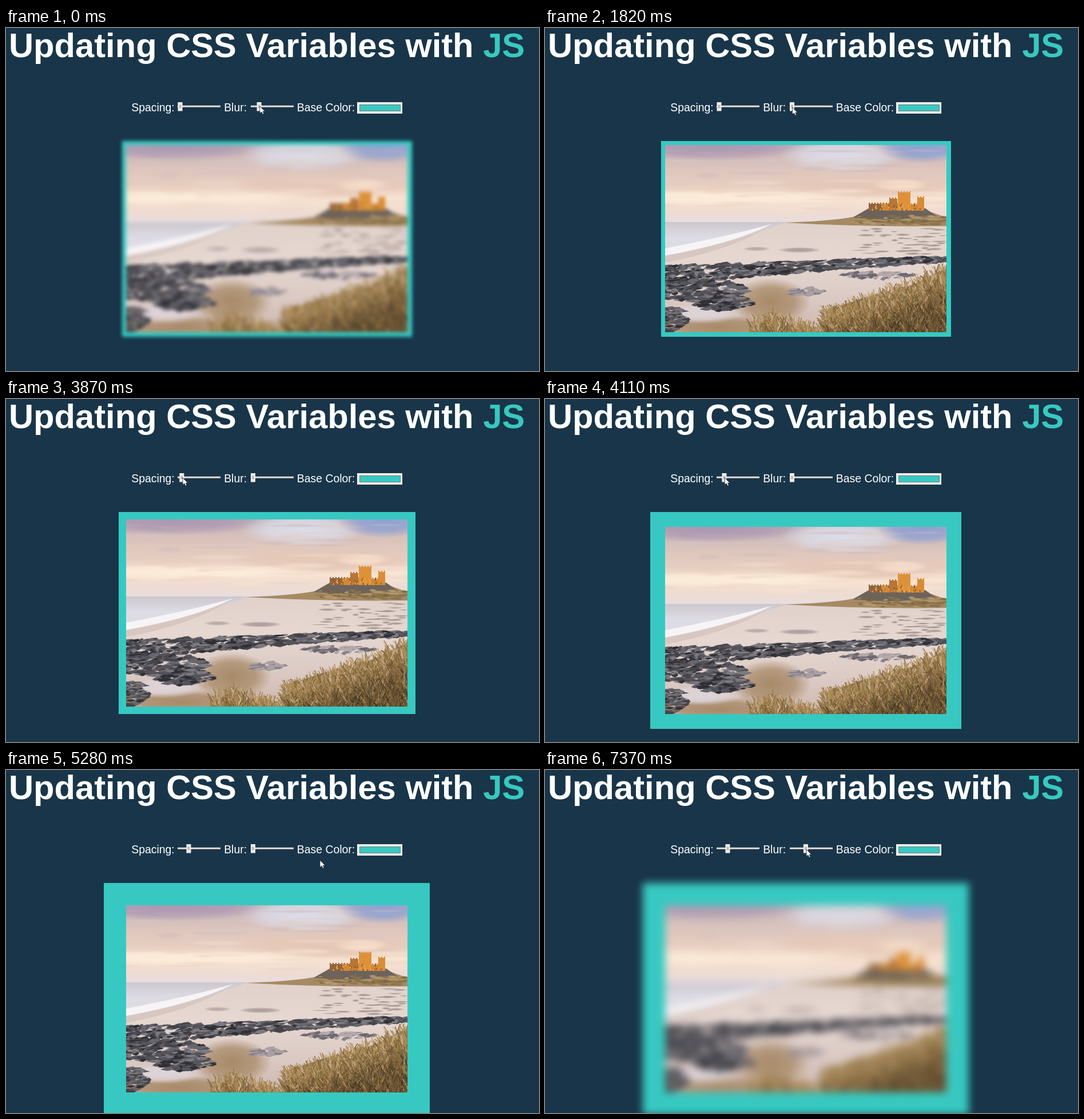
An HTML page with a canvas that plays this animation: 932x601 px, repeating every 8000 ms.

```html
<!DOCTYPE html>
<html lang="en">
<head>
<meta charset="utf-8">
<title>Updating CSS Variables with JS</title>
<style>
  :root { --base: #37c9c1; --spacing: 7.5px; --blur: 0px; }
  html, body { margin: 0; width: 100%; height: 100%; overflow: hidden; background: #193549; }
  canvas, svg { position: absolute; }
  canvas {
    left: calc(210.3px - var(--spacing)); top: 197.6px;
    padding: var(--spacing); background: var(--base); filter: blur(var(--blur));
  }
  svg { left: 0; top: 0; }
  text { font: 19.4px "Liberation Sans", Arial, sans-serif; fill: #fff; }
  .title { font-size: 59.7px; font-weight: bold; }
  .base { fill: var(--base); }
</style>
</head>
<body>
<canvas id="photo" width="492" height="328"></canvas>
<svg width="932" height="601" viewBox="0 0 932 601">
  <defs>
    <g id="thumb">
      <rect x="-4" y="130" width="8" height="15.5" fill="#f1efed"/>
      <path d="M-2 135.5h4M-2 137.5h4M-2 139.5h4" stroke="#8d8a88"/>
    </g>
  </defs>
  <text class="title" x="5" y="50.6">Updating CSS Variables with <tspan class="base">JS</tspan></text>
  <text x="219.3" y="145.5">Spacing:</text>
  <text x="381.2" y="145.5">Blur:</text>
  <text x="508.8" y="145.5">Base Color:</text>
  <path d="M300 137.3h75M428 137.3h75" stroke="#ead9d0" stroke-width="3"/>
  <use id="spacing" href="#thumb"/>
  <use id="blur" href="#thumb"/>
  <rect x="614" y="130" width="79" height="20" fill="#f4f4f4"/>
  <rect class="base" x="618.5" y="134.5" width="71" height="11" stroke="#6f7777"/>
  <path id="cursor" d="M0 0V12.5L3 10 5 14.3 7.2 13.3 5.3 9.2H9z" fill="#fff" stroke="#17212b" stroke-width=".8"/>
</svg>
<script>
const $ = id => document.getElementById(id);
const ctx = $('photo').getContext('2d');

let seed = 7;
const rand = (lo = 0, hi = 1) => {
  seed = (seed * 16807) % 2147483647;
  return lo + (hi - lo) * seed / 2147483647;
};
const pick = list => list[Math.floor(rand(0, list.length))];

function fade(y0, y1, ...colors) {
  const g = ctx.createLinearGradient(0, y0, 0, y1);
  colors.forEach((c, i) => g.addColorStop(i / (colors.length - 1), c));
  return g;
}
function shape(fill, path) {
  ctx.fillStyle = fill;
  ctx.fill(new Path2D(path));
}
function glow(x, y, rx, ry, color) {
  const g = ctx.createRadialGradient(0, 0, 0, 0, 0, 1);
  g.addColorStop(0, color);
  g.addColorStop(.6, color + 'c0');
  g.addColorStop(1, color + '00');
  ctx.save();
  ctx.translate(x, y);
  ctx.scale(rx, ry);
  ctx.fillStyle = g;
  ctx.fillRect(-1, -1, 2, 2);
  ctx.restore();
}

function drawSky() {
  shape(fade(0, 140, '#c3b0ba', '#d2bdbb', '#dfc7bd', '#e6cdc0', '#f8e4d2', '#efdbd0', '#e6dee2'), 'M0 0H492V140H0z');
  glow(80, 2, 170, 26, '#ab98b2');
  glow(310, 18, 110, 30, '#dcdde8');
  glow(450, 4, 80, 28, '#8fa2d2');
  glow(350, 72, 170, 24, '#e5c7b6');
  glow(100, 92, 240, 13, '#fcecd9');
  glow(412, 70, 50, 12, '#f6dfcb');
  ctx.globalAlpha = .3;
  for (let i = 0; i < 70; i++) {
    const y = rand(10, 115);
    glow(rand(0, 492), y, rand(20, 70), rand(2, 6), pick(y < 60 ? ['#c4adb0', '#d8c6c8', '#e2c6b8'] : ['#e8cbb9', '#fbe9d6']));
  }
  ctx.globalAlpha = 1;
}

function drawShore() {
  shape(fade(135, 328, '#e0d1cb', '#e6d7d1', '#dccbc5', '#cdb8ae'), 'M0 135H492V328H0z');
  shape(fade(135, 190, '#cdc7ce', '#dddce5', '#dddce5'), 'M0 135H212Q130 170 0 194z');
  shape('#f7f4f6', 'M0 181Q110 160 188 138Q120 172 0 194z');
  shape('#d8c7c1', 'M0 194Q110 174 180 144Q110 186 0 206z');
  for (let i = 0; i < 45; i++) glow(rand(340, 492), rand(146, 192), rand(5, 18), rand(1, 2.5), '#a7958f');
  glow(160, 182, 24, 4, '#b7a6a3');
  glow(235, 184, 38, 5, '#ab9a99');
}

function drawCastle() {
  shape('#a58a64', 'M208 136Q330 132 356 118L455 114 492 127V142Q350 144 208 136z');
  shape('#6c635b', 'M328 127L356 111H455L475 125Q400 134 328 127z');
  for (let i = 0; i < 70; i++) glow(rand(335, 492), rand(124, 140), rand(4, 14), rand(1, 3), pick(['#7a6340', '#b89b6b', '#8c744c']));
  const block = (x, top, w, color) => {
    shape(color, `M${x} ${top}h${w}V115h${-w}z`);
    for (let i = 0; i < w; i += 5) shape(color, `M${x + i} ${top - 2}h2v2h-2z`);
  };
  block(356, 103, 36, '#94653b');
  block(380, 104, 72, '#d18735');
  block(392, 94, 14, '#b87536');
  block(407, 83, 22, '#dd923a');
  block(441, 92, 12, '#d98c36');
  for (let i = 0; i < 45; i++) shape(pick(['#8b5a30', '#e9a44c']), `M${rand(360, 448)} ${rand(102, 113)}h2v3h-2z`);
}

// scatters flat shards; place() gives the middle of each
function rocks(count, place, tones) {
  for (let i = 0; i < count; i++) {
    const [x, y] = place(), w = rand(3, 13), h = rand(1, 4);
    shape(pick(tones), `M${x - w} ${y + h / 2}l${w * .7} ${-h}l${w} ${-h * .3}l${w * .4} ${h}l${-w} ${h}z`);
  }
}
function drawRocks() {
  const dark = ['#2f2f35', '#45444a', '#55545b', '#68676e', '#7d7a80'];
  const inOval = (cx, cy, rx, ry) => () => {
    const a = rand(0, 2 * Math.PI), r = Math.sqrt(rand());
    return [cx + rx * r * Math.cos(a), cy + ry * r * Math.sin(a)];
  };
  glow(185, 275, 70, 42, '#a88a68');
  glow(95, 320, 110, 22, '#a88a68');
  glow(65, 295, 70, 18, '#ded5da');
  rocks(650, () => {
    const x = 492 * rand() ** 1.25, half = 16 - .024 * x;
    return [x, 226 - .055 * x + rand(-half, half)];
  }, dark);
  rocks(280, inOval(55, 253, 85, 19), dark);
  rocks(160, inOval(100, 276, 50, 14), dark);
  rocks(110, inOval(8, 305, 28, 22), [...dark, '#8a7057']);
  rocks(60, inOval(370, 228, 65, 6), ['#87818a', '#6d6870', '#b5a9ab']);
  rocks(30, inOval(245, 256, 28, 7), ['#87818a', '#aa9fa3']);
}

function grass(count, x0, x1, top) {
  for (let i = 0; i < count; i++) {
    const x = rand(x0, x1), edge = top(x);
    const y = edge + 14 + (340 - edge) * i / count, depth = Math.min(1, (y - edge) / 90);
    const light = rand(44, 64) - 27 * depth + (rand() < .2 ? 16 : 0);
    ctx.strokeStyle = `hsl(${rand(32, 40)} ${rand(28, 40)}% ${light}%)`;
    ctx.lineWidth = rand(.8, 2.2);
    ctx.beginPath();
    ctx.moveTo(x, y + 8);
    ctx.quadraticCurveTo(x, y - 8, x + rand(-14, 12), y - rand(8, 24));
    ctx.stroke();
  }
}
function drawGrass() {
  shape(fade(205, 328, '#b39a70', '#9a7f53', '#715a34'), 'M272 328L278 292Q370 258 400 254T492 214V328z');
  grass(550, 150, 272, x => 290 + Math.abs(x - 190) * .4);
  grass(2200, 275, 496, x => 290 - 82 * ((x - 270) / 222) ** 1.15);
}

[drawSky, drawShore, drawCastle, drawRocks, drawGrass].forEach(paint => paint());

const LOOP = 8000, START = { x: 443.8, y: 137 };
// pointer moves: start, end, x, y, sag of the path
const moves = [
  [640, 1240, 439, 139], [1420, 2160, 427, 139],
  [2460, 3250, 314, 133, 80], [3280, 3450, 306.5, 138],
  [3760, 4350, 319.5, 138], [4890, 5120, 549, 158],
  [5580, 6100, 433, 138], [6380, 7370, 457, 139]
];
const clamp = (v, lo, hi) => Math.min(hi, Math.max(lo, v));

function pointerAt(t) {
  let { x, y } = START;
  for (const [from, to, x1, y1, sag = 0] of moves) {
    const f = clamp((t - from) / (to - from), 0, 1);
    x += (x1 - x) * f;
    y += (y1 - y) * f + sag * Math.sin(Math.PI * f);
  }
  return { x, y };
}

function draw(now) {
  const t = now % LOOP, { x, y } = pointerAt(t);
  const blurring = t < 2300 || t > 6350;
  const blur = blurring ? Math.max(0, Math.round((x - 432) / 2.66)) : 0;
  const spacing = 7.5 + 2.42 * (pointerAt(clamp(t, 3600, 4700)).x - 306.5);

  const root = document.documentElement.style;
  root.setProperty('--spacing', spacing + 'px');
  root.setProperty('--blur', blur * .75 + 'px');
  $('spacing').setAttribute('x', 304.5 + (spacing - 7.5) / 2.1);
  $('blur').setAttribute('x', 432 + blur * 2.66);
  $('cursor').setAttribute('transform', `translate(${x} ${y})`);
  requestAnimationFrame(draw);
}
requestAnimationFrame(draw);
</script>
</body>
</html>
```
